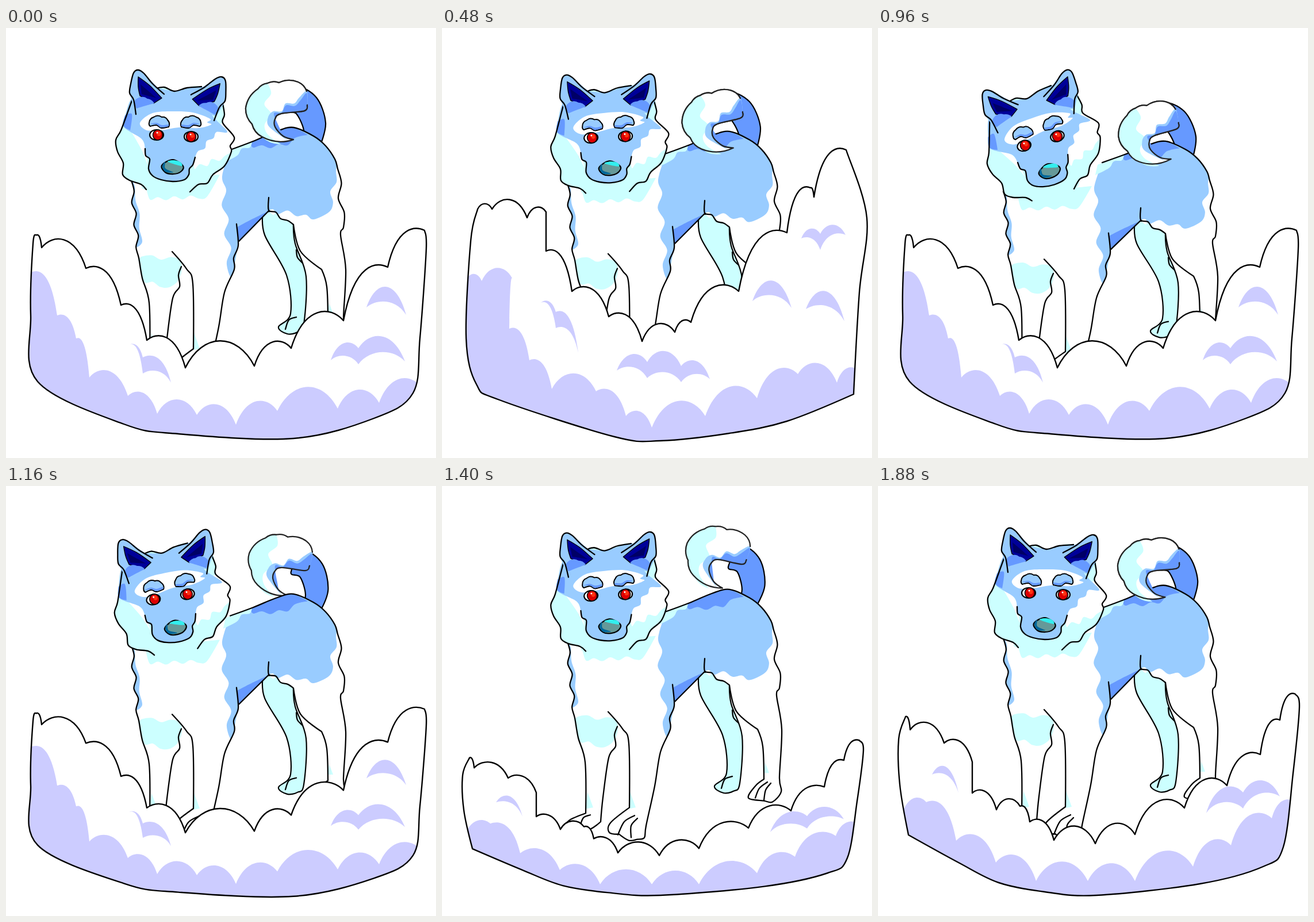
Recreate the animation shown at these times as an HTML page. Size 748x748 px, loop 1.92 s.

```html
<!DOCTYPE html>
<html>
<head>
<meta charset="utf-8">
<style>
html, body { margin: 0; width: 100%; height: 100%; overflow: hidden; background: #fff; }
svg { display: block; width: 100vw; height: 100vh; }
path { stroke-linecap: round; stroke-linejoin: round; vector-effect: non-scaling-stroke; }
</style>
</head>
<body>
<svg id="stage" viewBox="0 0 748 748"></svg>
<script>
const CYAN = '#ccffff', SKY = '#99ccff', BLUE = '#6699ff', LILAC = '#ccccff', INK = '#000';
const stage = document.getElementById('stage');

const points = text => text.trim().split(/\s+/).map(s => {
  const [x, y] = s.replace('!', '').split(',').map(Number);
  return { x, y, sharp: s.endsWith('!') };
});
const join = (...parts) => parts.map((d, i) => i ? d.replace('M', 'L') : d).join('');

// Builds a path from each pair of neighbouring points.
function chain(pts, segment) {
  return `M${pts[0].x} ${pts[0].y}` + pts.slice(1).map((b, i) => segment(pts[i], b, i)).join('');
}
// Smooth curve through points; a trailing "!" marks a corner.
function smooth(text, closed) {
  const pts = points(text), n = pts.length;
  const at = i => closed ? pts[(i + n) % n] : pts[Math.max(0, Math.min(n - 1, i))];
  const handle = (i, dir) => {
    const p = at(i), a = at(i - 1), b = at(i + 1), k = p.sharp ? 0 : dir / 6;
    return `${p.x + (b.x - a.x) * k} ${p.y + (b.y - a.y) * k}`;
  };
  const run = closed ? [...pts, pts[0]] : pts;
  return chain(run, (a, b, i) => `C${handle(i, 1)} ${handle(i + 1, -1)} ${b.x} ${b.y}`);
}
// Rounded snow humps that meet in the given valleys.
const humps = (pts, lift = .5) => chain(pts, (a, b) => {
  const dx = b.x - a.x, w = Math.abs(dx);
  const top = Math.min(a.y, b.y) - Math.max(.12 * w, lift * w - .4 * Math.abs(b.y - a.y));
  return `C${a.x + dx / 4} ${top} ${b.x - dx / 4} ${top} ${b.x} ${b.y}`;
});
// Fluffy edge that bulges between notches.
const puffs = (text, bulge = .3) => chain(points(text), (a, b) => {
  const dx = b.x - a.x, dy = b.y - a.y;
  return `Q${(a.x + b.x) / 2 - dy * bulge} ${(a.y + b.y) / 2 + dx * bulge} ${b.x} ${b.y}`;
});
// Points of a wavy edge from one place to another.
function ripple(x0, y0, x1, y1, n, amp) {
  const dx = x1 - x0, dy = y1 - y0, len = Math.hypot(dx, dy);
  return Array.from({ length: n + 1 }, (_, i) => {
    const off = i % n ? amp * (-1) ** i / len : 0;
    return `${x0 + dx * i / n - dy * off},${y0 + dy * i / n + dx * off}`;
  }).join(' ');
}

const fill = (color, shape, width = 0) =>
  `<path d="${shape[0] === 'M' ? shape + 'Z' : smooth(shape, true)}" fill="${color}" stroke="${width ? INK : 'none'}" stroke-width="${width}"/>`;
const line = (shape, color = INK) =>
  `<path d="${shape[0] === 'M' ? shape : smooth(shape)}" fill="none" stroke="${color}" stroke-width="2.3"/>`;
const oval = (x, y, rx, ry, color, width = 0) =>
  `<ellipse cx="${x}" cy="${y}" rx="${rx}" ry="${ry}" fill="${color}" stroke="${INK}" stroke-width="${width}"/>`;
const placed = (transform, markup) => `<g transform="${transform}">${markup}</g>`;

function tailBase() {
  return fill(BLUE, '506,104 540,121 556,165 546,206! 514,202! 518,178 505,149 488,143', 2.2);
}
function tailFluff() {
  const left = '455,96 438,106 417,139 428,167 445,189 500,194';
  const hole = '482,188 468,172 468,158 478,149 519,144 524,134';
  const edge = join(puffs('523,110 508,94 475,95 ' + left, .22), smooth('500,194! ' + hole));
  return fill('#fff', edge) +
    fill(CYAN, join(puffs(left.replace('500,194', '478,202'), .22), smooth(`478,202! ${ripple(456,186,455,96,5,6)}`))) +
    fill(SKY, `523,110 ${ripple(510,121,456,155,5,4)} 458,172 492,197! ${hole}`) +
    fill(BLUE, `523,113 ${ripple(512,126,466,150,4,4)} ${hole}`) +
    line(edge, '#222');
}

function dogBody() {
  const back = '390,212! 430,197 470,180 500,173 535,188 556,205';
  const rear = `572,228 ${ripple(577,245,587,347,4,4)} 582,360 591,420 587,505`;
  const hindPaw = '590,530 575,548 560,546 533,541 545,520 560,508!';
  const thigh = `558,450 549,420! 512,388 500,342! ${ripple(490,335,457,317,3,3)}`;
  const chest = ripple(218,265,231,400,7,3);
  const leftLeg = `${chest} 237,435 249,478 250,568! 222,580 220,590 252,598 276,583! 280,540 290,470 302,450 300,430 305,415`;
  const rightLeg = '289,389! 314,419 325,445 326,558! 293,585 291,602 308,605! 325,616 340,614 352,611 355,590 370,520 380,460 397,420 396,400 404,378 401,341';
  return fill(CYAN, '447,320! 450,360 488,430 495,497 474,520 489,532 507,529 518,515 522,432 503,375 500,340! 475,318!', 2.2) +
    line('505,503 492,508 486,524') +
    fill('#fff', `${back} ${rear} ${hindPaw} ${thigh}`) +
    fill('#fff', `${leftLeg} ${rightLeg} 457,317! 390,212!`) +
    fill(SKY, `${back} 574,230 ${ripple(574,250,562,320,4,4)} 535,333 ${ripple(522,325,457,318,4,4)} 404,374! 397,415 ${ripple(391,433,376,258,7,5)}`) +
    fill(BLUE, '401,347! 425,334 456,319! 404,372!') +
    fill(BLUE, `425,200! ${ripple(430,208,490,204,4,3)} 503,191 525,186! 500,174 470,180`) +
    fill(CYAN, '382,216! 428,198! 424,208 410,210 402,222 378,235!') +
    fill(SKY, `${chest.replace(/ [^ ]+$/, '')} ${ripple(237,372,224,275,4,2)}`) +
    fill(CYAN, `242,268! ${ripple(250,298,350,293,7,3)} 372,255!`) +
    fill(CYAN, `230,402! ${ripple(238,397,302,403,4,3)} 306,420 299,440 ${ripple(284,451,240,441,3,3)}`) +
    fill(CYAN, '253,530! 263,558! 250,560!') + fill(CYAN, '327,530! 337,558! 327,560!') +
    fill(CYAN, '562,478! 569,497! 560,497!') +
    line(`${back} ${rear} ${hindPaw} ${thigh} 457,295`) +
    line('566,513 552,524 545,541') + line('572,515 563,527 560,545') +
    line('505,386 507,399 516,409') + line('457,318! 405,371!') +
    line(leftLeg) + line('258,571 246,576 240,591') +
    line(rightLeg) + line('335,572 317,583 306,606') + line('340,577 329,590 329,611');
}

const ear =
  fill(SKY, '224,142! 215,113 217,97 222,78 230,73 240,79 275,116! 257,136') +
  fill('#000099', '230,85! 250,100 271,122! 257,131! 233,118! 230,103', 1.3) +
  fill('#000066', '234,98! 262,122! 236,115!') +
  fill(BLUE, join(puffs('222,130 234,120 246,123 258,131', -.25), smooth('258,131! 240,136 227,140'))) +
  line('226,150 222,125 215,113 217,97 222,78 230,73 240,79 255,97 275,115');
const brow =
  fill(SKY, join(puffs('283,172 281,160 271,155 257,155 249,165 251,171', .35), smooth('251,171! 262,169 270,174 283,172')), 2) +
  fill(BLUE, '251,167 262,165 271,169 282,168 282,171 270,173 262,168');
const eye = (x, y, shift) =>
  oval(x, y, 12, 9, '#fff', 2.2) + oval(x + shift, y, 8.5, 9, '#d00', 1.5) +
  oval(x + shift + 2, y - 2, 3.5, 4, '#f31') + oval(x + shift - 1, y - 4, 1.5, 1.5, '#fff');

function dogHead() {
  const maneLeft = '222,118 214,140 200,178 191,195 194,215 204,235 203,255 215,265 235,272 244,281';
  const maneRight = '320,285 335,272 350,270 360,255 380,240 392,215 390,205 397,190 377,165 380,150 375,122';
  const crown = '340,102 315,104 293,110 275,103 258,106';
  const muzzle = '242,210 243,222 250,228 248,245 255,257 270,264 290,267 310,264 318,255 319,245 325,238 329,225';
  return fill(CYAN, `${maneLeft} ${maneRight} ${crown}`) +
    fill('#fff', `358,178! 377,166 397,190 390,205 392,215 ${ripple(380,223,328,245,5,4)} 328,222 345,195`) +
    fill('#fff', '216,177! 236,193 243,212 246,238! 236,212') +
    fill(SKY, `208,150 222,118 258,105 293,109 340,102 365,112 372,130 358,150 385,180 ${ripple(366,181,329,225,5,3)} ${muzzle.split(' ').reverse().join(' ')} 236,193 205,172`) +
    fill(BLUE, '207,152! 219,150 216,178! 204,170') +
    fill('#fff', '233,165 255,148 290,145 325,147 355,158 350,164 357,168 335,174 300,173 270,178 245,178') +
    [maneLeft, maneRight, crown, muzzle].map(s => line(s)).join('') +
    ear + placed('translate(375 85) rotate(12.7) scale(-1 1) translate(-230 -73)', ear) +
    brow + placed('translate(588 0) scale(-1 1)', brow) +
    eye(262, 186, 2) + eye(322, 189, 0) +
    fill('#669999', '271,239 290,229 308,240 304,250 291,254 277,251', 2.2) +
    fill('#006699', '272,240 277,233 277,244 291,251 277,250') +
    fill('#33eeee', '281,232 291,230 303,233 306,240 290,236');
}

// Each snow bank: valleys of the rim, its bowl, valleys of the shade, and crescents.
const banks = {
  a: {
    rim: '53,360 62,382 139,418 200,482 245,543 312,591 432,588 496,557 587,509 664,416 728,352',
    bowl: '728,352 731,385 720,540 708,635 640,679 500,714 300,706 205,689 55,615 43,500 47,375 53,360',
    shade: '44,425 89,500 122,540 145,608 212,640 263,671 332,673 400,690 472,666 577,662 649,652 725,628',
    wisps: ['214,551 238,573 287,617', '627,486 696,499', '565,578 613,557 694,580']
  },
  b: {
    rim: '58,333 79,349 131,354 151,349 157,412 192,436 223,497 276,526 322,551 368,549 425,548 488,517 557,470 616,404 675,335 711,281',
    bowl: '711,281 732,400 718,560 713,625 640,674 480,718 420,723 280,695 150,665 60,615 39,470 42,400 58,333',
    shade: '40,450 79,469 135,475 145,566 192,631 240,658 322,680 399,670 465,655 557,637 652,605 725,553',
    wisps: ['183,527 229,545 262,580', '634,433 669,411 711,424', '442,594 495,568 565,526 635,512']
  },
  c: {
    rim: '62,315 87,315 148,330 181,320 181,388 226,458 290,502 348,545 405,529 433,512 516,458 600,356 641,278 647,294 703,212',
    bowl: '703,212 739,330 726,460 716,637! 600,684 500,705 380,718 300,711 100,647 60,620 42,540 50,370 62,315',
    shade: '44,435 69,440 122,435 117,523 152,578 191,628 268,632 320,675 365,695 458,675 548,644 619,602 687,617 725,597',
    wisps: ['172,478 198,494 237,565', '304,596 357,581 416,588 466,611', '540,475 608,487', '625,366 658,358 702,360', '633,489 700,510']
  },
  d: {
    rim: '48,401 56,424 115,447 164,480 164,534 206,563 247,557 264,584 306,616 378,622 447,606 533,560 607,521 665,467 699,407 726,362',
    bowl: '726,362 733,385 722,500 705,628 670,662 560,692 380,712 290,706 210,690 140,655 53,607! 38,520 36,440 48,401',
    shade: '42,570 84,550 136,617 205,655 275,687 365,687 447,687 548,662 614,625 685,578 725,550',
    wisps: ['94,502 140,534', '571,569 635,533 699,540']
  }
};
function crescent(text) {
  const upper = points(text), last = upper.length - 1;
  const lower = upper.map((p, i) => ({ x: p.x, y: p.y + (i % last ? 28 : 0) })).reverse();
  return fill(LILAC, join(humps(upper, last > 1 ? .5 : .8), humps(lower, .3)));
}
function snowBank([id, bank]) {
  const outline = join(humps(points(bank.rim)), smooth(bank.bowl)) + 'Z';
  return `<g id="bank-${id}"><clipPath id="clip-${id}"><path d="${outline}"/></clipPath>` +
    fill('#fff', outline) +
    `<g clip-path="url(#clip-${id})">${fill(LILAC, humps(points(bank.shade)) + 'V740H30')}</g>` +
    bank.wisps.map(crescent).join('') + fill('none', outline, 2.4) + '</g>';
}

stage.innerHTML =
  `<g id="tail">${tailBase()}</g><g id="fluffBehind">${tailFluff()}</g><g id="body">${dogBody()}</g>` +
  `<g id="fluffFront">${tailFluff()}</g><g id="head">${dogHead()}</g>` +
  Object.entries(banks).map(snowBank).join('');
const part = id => document.getElementById(id);
const pose = (id, transform) => part(id).setAttribute('transform', transform);
const show = (id, on) => part(id).setAttribute('display', on ? 'inline' : 'none');

// One wag: sinks slowly, swings up past rest, settles again.
function tailAngle(step) {
  const u = (step - 26) / 6.5;
  return 21 * u * Math.exp(.5 - u * u / 2);
}
// Snow changes height within each six-step drawing; the lowest bank sinks and regrows.
function bankHeight(name, step) {
  if (name === 'd') return .77 + .046 * Math.max(0, Math.abs(step - 38.5) - 3.5);
  return 1 + (step < 12 ? .02 : -.02) * (step % 6);
}

function draw(ms) {
  const step = Math.floor(ms / 40) % 48;
  const crouch = Math.pow(Math.min(step, 47 - step) / 18, 1.93);
  const angle = tailAngle(step), sink = 14.5 * crouch;
  pose('tail', `translate(0 ${sink}) rotate(${angle / 2} 548 200)`);
  for (const id of ['fluffBehind', 'fluffFront']) pose(id, `translate(0 ${sink}) rotate(${angle} 565 145)`);
  show('fluffFront', angle < 4);
  pose('body', `translate(0 655) scale(1 ${1 - .031 * crouch}) translate(0 -655)`);
  pose('head', `rotate(${-11.7 * crouch} 315 219)`);

  const name = 'abcbaddd'[Math.floor(step / 6)];
  for (const id in banks) show('bank-' + id, id === name);
  pose('bank-' + name, `translate(0 712) scale(1 ${bankHeight(name, step)}) translate(0 -712)`);
}

const start = performance.now();
function tick() {
  draw((performance.now() - start) % 1920);
  requestAnimationFrame(tick);
}
tick();
</script>
</body>
</html>
```
